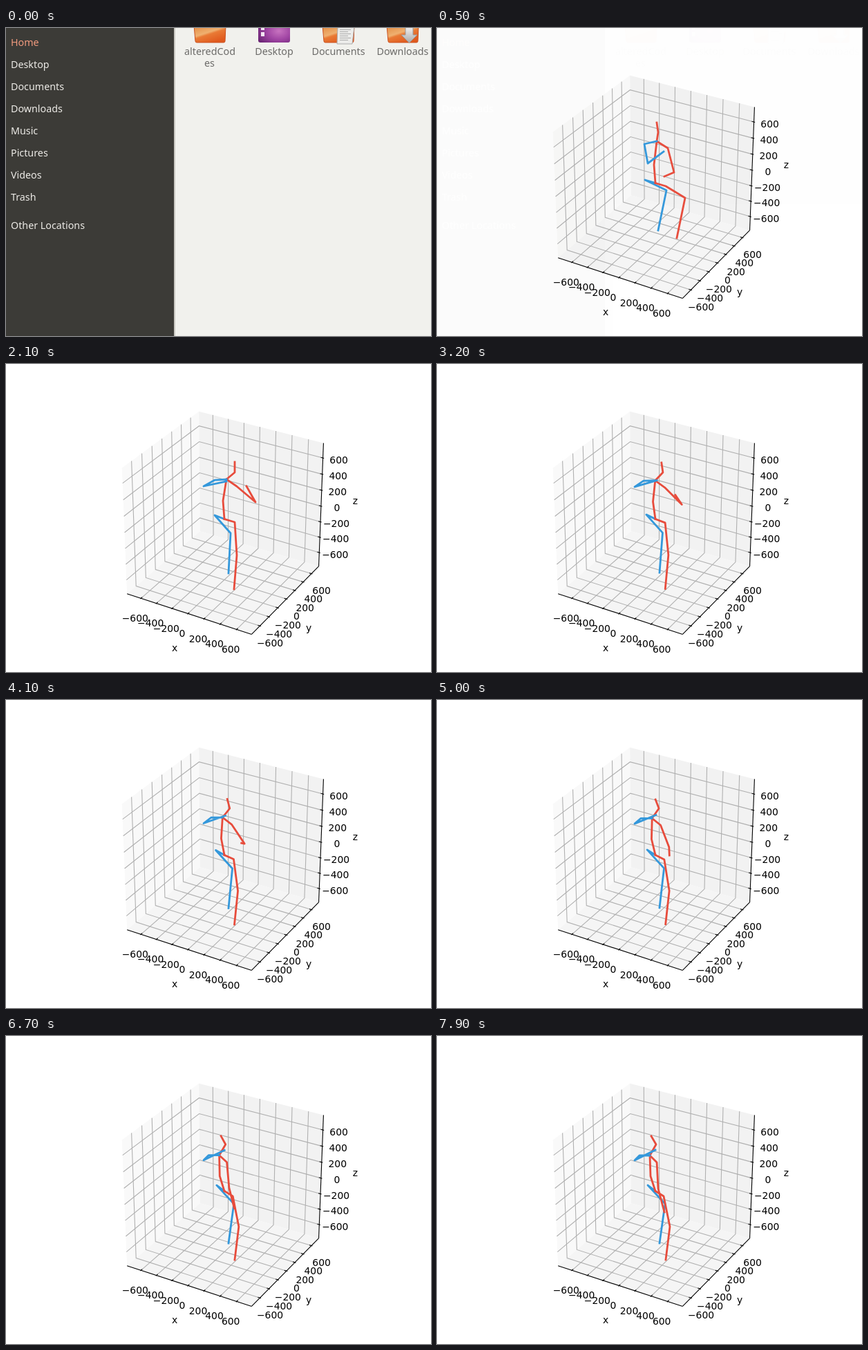
An HTML page for the animation above (8000 ms loop, 615x446 px).

```html
<!DOCTYPE html>
<html lang="en">
<head>
<meta charset="utf-8">
<title>3D pose plot</title>
<style>
html, body { margin: 0; width: 100%; height: 100%; overflow: hidden; background: #fff; }
svg { display: block; width: 615px; height: 446px; }
#plot text { font: 13.9px "DejaVu Sans", sans-serif; text-anchor: middle; }
#files text { font: 14.3px "Noto Sans", "Open Sans", sans-serif; }
#files .side { fill: #eceae6; }
#files .side:first-of-type { fill: #f19a7e; }
#files .item { fill: #6c6b69; text-anchor: middle; }
</style>
</head>
<body>
<svg viewBox="0 0 615 446">
  <defs>
    <linearGradient id="orange" x1="0" y1="0" x2=".6" y2="1">
      <stop offset="0" stop-color="#e2893f"/><stop offset=".5" stop-color="#efb070"/>
      <stop offset=".6" stop-color="#e97a35"/><stop offset="1" stop-color="#e05a1e"/>
    </linearGradient>
    <radialGradient id="purple" cx=".65" cy=".5" r=".75">
      <stop offset="0" stop-color="#c873c0"/><stop offset=".5" stop-color="#a045a3"/>
      <stop offset="1" stop-color="#6b2575"/>
    </radialGradient>
    <linearGradient id="steel" x1="0" y1="0" x2="0" y2="1">
      <stop offset="0" stop-color="#f4f4f4"/><stop offset="1" stop-color="#a9a9a9"/>
    </linearGradient>
  </defs>
  <g id="plot"></g>
  <g id="files"></g>
</svg>
<script>
const plot = document.getElementById('plot');
const files = document.getElementById('files');

function add(parent, tag, attrs, text) {
  const el = document.createElementNS('http://www.w3.org/2000/svg', tag);
  for (const k in attrs) el.setAttribute(k, attrs[k]);
  if (text) el.textContent = text;
  return parent.appendChild(el);
}

// Perspective view of a unit cube: elevation 30°, azimuth -60°, distance 10.
function project([a, b, c]) {
  const k = 2081 / (10 - (.433 * a - .75 * b + .5 * c));
  return [316 + k * (.866 * a + .5 * b), 224.6 - k * (-.25 * a + .433 * b + .866 * c)];
}
const toPath = pts => 'M' + pts.map(p => p.map(n => n.toFixed(2)).join(' ')).join('L');
const solid = pts => toPath(pts.map(project));

function stroke(pts, color) {
  add(plot, 'path', { d: solid(pts), fill: 'none', stroke: color, 'stroke-width': 1.1 });
}

function buildPlot() {
  const L = -.5, H = .5;
  const panes = [
    ['#f9f9f9', [L, L, L], [L, H, L], [L, H, H], [L, L, H]],
    ['#f2f2f2', [L, H, L], [H, H, L], [H, H, H], [L, H, H]],
    ['#f5f5f5', [L, L, L], [H, L, L], [H, H, L], [L, H, L]]
  ];
  for (const [fill, ...pts] of panes) add(plot, 'path', { d: solid(pts) + 'Z', fill });

  const axes = [
    { name: 'x', at: v => [v, L, L], grid: v => [[v, L, L], [v, H, L], [v, H, H]], tick: [0, 1, 0], label: [-8.5, 33.7], title: [244, 416] },
    { name: 'y', at: v => [H, v, L], grid: v => [[H, v, L], [L, v, L], [L, v, H]], tick: [-1, 0, 0], label: [14.6, 29.7], title: [438, 386.5] },
    { name: 'z', at: v => [H, H, v], grid: v => [[L, L, v], [L, H, v], [H, H, v]], tick: [-1, 0, 0], label: [23, 7.5], title: [505.5, 203] }
  ];
  const values = Array.from({ length: 7 }, (_, i) => 200 * (i - 3));
  const place = v => v / 1562.5;

  for (const axis of axes) for (const v of values) stroke(axis.grid(place(v)), '#b0b0b0');
  for (const { name, at, tick, label, title } of axes) {
    stroke([at(L), at(H)], '#000');
    for (const v of values) {
      const p = at(place(v));
      stroke([-.0083, .0167].map(d => p.map((n, i) => n + d * tick[i])), '#000');
      const [x, y] = project(p);
      add(plot, 'text', { x: x + label[0], y: y + label[1] }, String(v).replace('-', '\u2212'));
    }
    add(plot, 'text', { x: title[0], y: title[1] }, name);
  }
}

function buildFiles() {
  const box = (x, y, width, height, fill, rx = 0) => add(files, 'rect', { x, y, width, height, fill, rx });
  const shape = (d, fill, stroke) => add(files, 'path', { d, fill, stroke });

  box(0, 0, 615, 446, '#f1f1ed');
  box(0, 0, 243, 446, '#3c3b37');
  box(243, 0, 2, 446, '#c9c7c1');
  ['Home', 'Desktop', 'Documents', 'Downloads', 'Music', 'Pictures', 'Videos', 'Trash', 'Other Locations']
    .forEach((name, i) => add(files, 'text', { x: 7, y: 26 + 32 * i + (i > 7 ? 9 : 0), class: 'side' }, name));

  // Four icon columns, 93 px apart; the second is the desktop.
  for (const col of [0, 2, 3]) {
    const x = 272 + 93 * col;
    shape(`M${x} -4H${x + 46}L${x + 45} 19Q${x + 45} 21 ${x + 43} 21H${x + 4}Q${x + 2} 21 ${x + 2} 19Z`, 'url(#orange)', '#c9501f');
  }
  box(365, -12, 46, 33, 'url(#purple)', 3);
  box(369, -2, 5, 5, '#f3e6f3');
  box(369, 6, 5, 6, '#f3e6f3');
  shape('M480 -2H504L501 23H479Z', '#ececea', '#aaa');
  for (let y = 2; y < 19; y += 3) box(483, y, y % 2 ? 12 : 16, 1, '#aaa');
  shape('M578 -2H589V10H595L583.5 21.5L572 10H578Z', 'url(#steel)', '#999');

  ['alteredCod', 'Desktop', 'Documents', 'Downloads']
    .forEach((name, i) => add(files, 'text', { x: 295 + 93 * i, y: 39, class: 'item' }, name));
  add(files, 'text', { x: 294.5, y: 56, class: 'item' }, 'es');
}

// Joints move from sitting to standing, then drift into a relaxed stance.
const joints = {
  hipR: [[301, 220], [302, 219], [305, 216]],
  kneeR: [[332, 235], [325, 245], [330, 243]],
  footR: [[320, 293], [322, 303], [322, 300]],
  hipL: [[331, 229], [331, 229], [328, 232]],
  kneeL: [[359, 246], [334, 277], [337, 276]],
  footL: [[347, 304], [330, 326], [331, 324]],
  spine: [[314, 198], [314, 198], [309, 203]],
  chest: [[318, 164], [319, 167], [308, 173]],
  neck: [[320, 151], [331, 157], [317, 157]],
  head: [[318, 137], [331, 142], [310, 145]],
  elbowL: [[343, 209], [361, 200], [320, 221]],
  wristL: [[329, 215], [348, 177], [329, 255]],
  elbowR: [[305, 196], [286, 177], [286, 180]],
  wristR: [[328, 179], [319, 170], [316, 165]]
};
const STAND = 2100, END = 7900;
const easeOut = p => Math.sin(p * Math.PI / 2);
const swing = p => easeOut(p ** .8) ** 2;
const shift = ([x, y], dx, dy) => [x + dx, y + dy];

function poseAt(t) {
  const rising = t < STAND;
  const p = rising ? (t - 500) / (STAND - 500) : (t - STAND) / (END - STAND);
  const pose = { root: [316, 224.5] };
  for (const name in joints) {
    const [from, to] = joints[name].slice(rising ? 0 : 1);
    const ease = !rising && /(elbow|wrist)L/.test(name) ? swing : easeOut;
    pose[name] = from.map((n, i) => n + (to[i] - n) * ease(p));
  }
  const q = (t - 500) / (END - 500);
  pose.shoulderL = shift(pose.chest, 16 - 6 * q, 10);
  pose.shoulderR = shift(pose.chest, -18 + 3 * q, 4 * (1 - q) ** 5);
  return pose;
}

buildPlot();
buildFiles();

const limbs = [
  ['#3498db', 'root hipR kneeR footR'],
  ['#e74c3c', 'root hipL kneeL footL'],
  ['#e74c3c', 'root spine chest neck head'],
  ['#e74c3c', 'chest shoulderL elbowL wristL'],
  ['#3498db', 'chest shoulderR elbowR wristR']
].map(([color, names]) => ({
  names: names.split(' '),
  el: add(plot, 'path', {
    fill: 'none', stroke: color, 'stroke-width': 2.8,
    'stroke-linecap': 'square', 'stroke-linejoin': 'round'
  })
}));

// The plot redraws every 100 ms at first, then about every 156 ms on the same grid.
function lastRedraw(t) {
  const tick = Math.floor(t / 100);
  if (tick < 16) return tick * 100;
  const count = Math.ceil((tick - 15.5) / 1.56) - 1;
  return 100 * Math.floor(16.5 + 1.56 * count);
}

const start = performance.now();
function draw() {
  const t = (performance.now() - start) % 8000;
  const showFiles = t < 500;
  plot.style.display = showFiles ? 'none' : '';
  files.style.display = t < 600 ? '' : 'none';
  files.style.opacity = showFiles ? 1 : .01;
  if (!showFiles) {
    const pose = poseAt(lastRedraw(t));
    for (const { names, el } of limbs) el.setAttribute('d', toPath(names.map(n => pose[n])));
  }
  requestAnimationFrame(draw);
}
draw();
</script>
</body>
</html>
```
